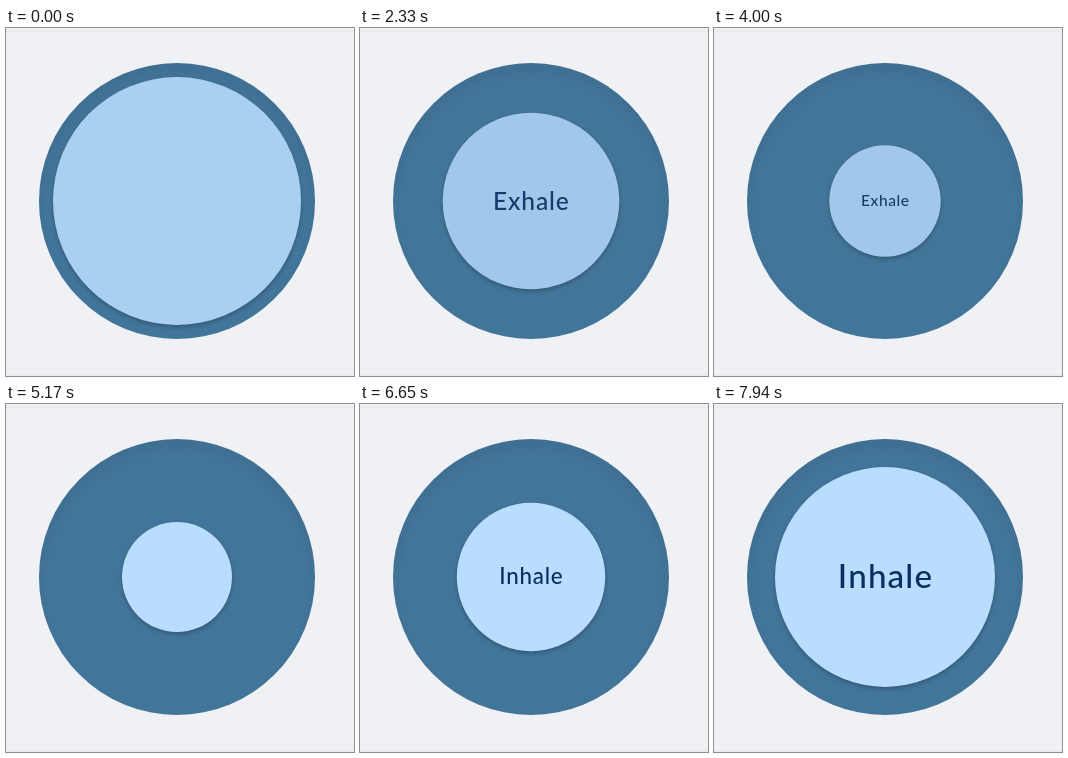
These frames come from a looping animation (348x348 px, 8000 ms). An HTML page with a canvas:

```html
<!DOCTYPE html>
<html lang="en">
<head>
<meta charset="utf-8">
<title>Breathing circle</title>
<style>
  html, body { margin: 0; width: 100%; height: 100%; overflow: hidden; background: #f0f1f4; }
  canvas { display: block; width: 348px; height: 348px; }
</style>
</head>
<body>
<canvas id="stage"></canvas>
<script>
const SIZE = 348, LOOP = 8000;
const CX = 171, CY = 173, OUTER = 138, BIG = 124, SMALL = 55;
const EXHALE = 290, INHALE = 5190, MOVE = 4000, PAUSE = 900, FADE = 250;
const BASE = [66, 117, 154], LIGHT = [185, 221, 255], INK = [10, 47, 95];

const canvas = document.getElementById('stage');
const ctx = canvas.getContext('2d');
const scale = window.devicePixelRatio || 1;
canvas.width = canvas.height = SIZE * scale;

const clamp = x => Math.min(1, Math.max(0, x));
const lerp = (a, b, k) => a + (b - a) * k;
const blend = (color, alpha) => `rgb(${color.map((c, i) => Math.round(lerp(BASE[i], c, alpha)))})`;

// cubic-bezier(.42, 0, .58, 1)
function easeInOut(x) {
  let lo = 0, hi = 1;
  for (let i = 0; i < 24; i++) {
    const s = (lo + hi) / 2;
    if (1.26 * s - 0.78 * s * s + 0.52 * s ** 3 < x) lo = s; else hi = s;
  }
  return lo * lo * (3 - 2 * lo);
}

const progress = (t, start) => easeInOut(clamp((t - start) / MOVE));

function radiusAt(t) {
  return t < INHALE
    ? lerp(BIG, SMALL, progress(t, EXHALE))
    : lerp(SMALL, BIG, progress(t, INHALE));
}

// The disc dims in the pause before an exhale and brightens before an inhale.
function opacityAt(t) {
  const dim = clamp((t - EXHALE + PAUSE) / PAUSE);
  const glow = clamp((t - INHALE + PAUSE) / PAUSE);
  return 1 - 0.2 * (dim - glow);
}

function disc(x, y, r, fill) {
  ctx.beginPath();
  ctx.arc(x, y, r, 0, Math.PI * 2);
  ctx.fillStyle = fill;
  ctx.fill();
}

function drawBackground() {
  ctx.fillStyle = '#f0f1f4';
  ctx.fillRect(0, 0, SIZE, SIZE);
  ctx.fillStyle = '#e1e3e6';
  ctx.fillRect(0, 2.5, SIZE, 1);
  ctx.fillRect(0, 346.5, SIZE, 1);
  disc(CX, CY, OUTER, blend(BASE, 1));
  const shade = ctx.createRadialGradient(CX, CY + 8, 128, CX, CY + 8, 146);
  shade.addColorStop(0, 'rgba(0,0,0,0)');
  shade.addColorStop(1, 'rgba(0,0,0,.06)');
  disc(CX, CY, OUTER, shade);
}

function drawDisc(r, alpha) {
  ctx.save();
  ctx.shadowColor = 'rgba(0,0,0,.25)';
  ctx.shadowBlur = 4 * scale;
  ctx.shadowOffsetY = 2 * scale;
  disc(CX, CY, r, blend(LIGHT, alpha));
  ctx.restore();
}

function drawLabel(text, start, size, t, r, alpha) {
  const show = clamp((t - start) / FADE) * clamp((start + MOVE + FADE - t) / FADE);
  if (!show) return;
  const px = size * r;
  ctx.save();
  ctx.globalAlpha = show;
  ctx.font = `500 ${px}px Lato, "Open Sans", sans-serif`;
  ctx.letterSpacing = `${px * 0.035}px`;
  ctx.textAlign = 'center';
  ctx.fillStyle = blend(INK, alpha);
  ctx.fillText(text, CX + px * 0.015, CY + r * 0.098);
  ctx.restore();
}

function draw(t) {
  const r = radiusAt(t), alpha = opacityAt(t);
  ctx.setTransform(scale, 0, 0, scale, 0, 0);
  drawBackground();
  drawDisc(r, alpha);
  drawLabel('Exhale', EXHALE, 0.279, t, r, alpha);
  drawLabel('Inhale', INHALE, 0.302, t, r, alpha);
}

const began = performance.now();
function tick() {
  draw((performance.now() - began) % LOOP);
  requestAnimationFrame(tick);
}
tick();
</script>
</body>
</html>
```
